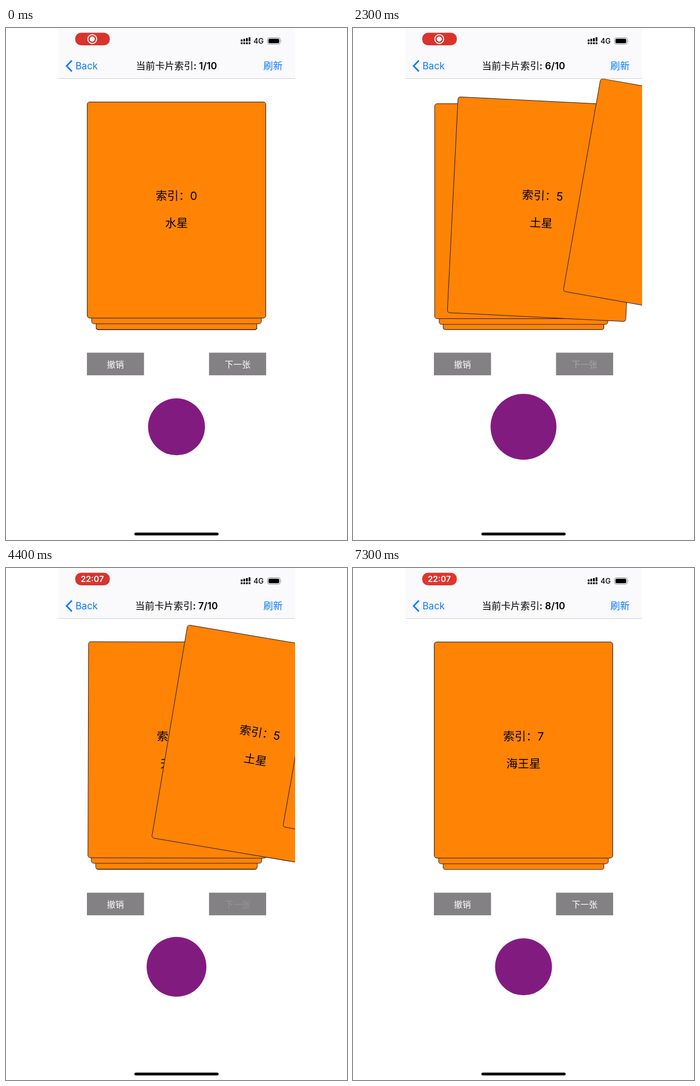
An HTML page that plays this animation: 611 by 917 pixels, repeating every 7.4 s.

```html
<!DOCTYPE html>
<html lang="zh-CN">
<head>
<meta charset="utf-8">
<title>卡片</title>
<style>
  html, body { margin: 0; width: 100%; height: 100%; overflow: hidden; background: #fff; }
  body, svg text { font-family: Inter, "Noto Sans CJK SC", "Noto Sans CJK", sans-serif; }
  #stage { position: absolute; left: 0; top: 0; width: 611px; height: 917px; overflow: hidden; }
  #phone { position: absolute; left: 94px; top: 0; width: 423.5px; height: 917px; overflow: hidden; }
  #cards { position: absolute; inset: 0; isolation: isolate; }
  .card {
    position: absolute; left: 51px; top: 131.5px; width: 321px; height: 388px;
    box-sizing: border-box; border: 1px solid #24202a; border-radius: 5px; background: #ff8305;
    color: #000; font-size: 20.5px; line-height: 30px; text-align: center; white-space: pre;
  }
  .card div { position: absolute; left: 0; width: 100%; }
  .card div:first-child { top: 153.5px; }
  .card div:last-child { top: 202.5px; }
  #header {
    position: absolute; left: 0; top: 0; width: 100%; height: 91px; box-sizing: border-box;
    border-bottom: 1px solid #d0cfd3; background: rgba(249, 248, 251, .8);
    backdrop-filter: blur(14px);
  }
  svg { position: absolute; left: 0; top: 0; }
</style>
</head>
<body>
<div id="stage">
  <div id="phone">
    <div id="cards"></div>
    <div id="header"></div>
  </div>
  <svg width="611" height="917" viewBox="0 0 611 917">
    <rect id="pill" x="124" y="8.5" width="62" height="22.5" rx="10.5"/>
    <g id="record" fill="#fff">
      <circle cx="154.5" cy="19.8" r="8" fill="none" stroke="#fff" stroke-width="1.8"/>
      <circle cx="154.5" cy="19.8" r="4.6"/>
    </g>
    <text id="clock" x="154.5" y="25" font-size="15" font-weight="600" fill="#fff" text-anchor="middle">22:07</text>

    <g id="signal"></g>
    <text x="443.5" y="28.3" font-size="13" font-weight="500">4G</text>
    <rect x="468.5" y="17.5" width="23" height="11.5" rx="3.3" fill="none" stroke="#888"/>
    <rect x="470.3" y="19.3" width="19.2" height="8" rx="1.8"/>
    <path d="M493.3 21.2q1.7 2 0 4z" fill="#888"/>

    <path d="M118 58.3L108.6 68l9.4 9.7" fill="none" stroke="#0a7aff" stroke-width="2.7"/>
    <text x="124.5" y="74" font-size="17" fill="#0a7aff">Back</text>
    <text x="305.5" y="74" font-size="17.2" font-weight="500" text-anchor="middle">当前卡片索引<tspan id="index" font-weight="600"></tspan></text>
    <text x="478.5" y="74" font-size="17.2" fill="#0a7aff" text-anchor="middle">刷新</text>

    <g fill="#848184">
      <rect x="145" y="581.5" width="102.3" height="40.5"/>
      <rect x="363.8" y="581.5" width="102.3" height="40.5"/>
    </g>
    <g font-size="15.3" fill="#fff" text-anchor="middle">
      <text id="undo" x="196" y="607.5">撤销</text>
      <text id="next" x="415" y="607.5">下一张</text>
    </g>
    <circle id="disc" cx="305.5" cy="714.3" fill="#821b80"/>
    <rect x="230" y="903.8" width="151" height="5" rx="2.5"/>
  </svg>
</div>
<script>
const LOOP = 7400, STEP = 100, SWELL = .36;
// travel: distance flown; shift: share of the time the stack moves; turn: distance to full tilt
const NEXT = { sign: 1, time: 550, travel: 480, shift: .2, turn: 178 };
const UNDO = { sign: -1, time: 420, travel: 420, shift: .55, turn: 325 };
const names = ['水星', '金星', '地球', '火星', '木星', '土星', '天王星', '海王星', '冥王星', '月球'];

// side: -1 left, 1 right; lift: rise per pixel travelled
const swipe = (start, card, side, lift = .066) => ({ start, card, kind: NEXT, side, lift });
const next = (start, card, lift) => ({ ...swipe(start, card, 1, lift), tap: true });
const undo = (start, card, lift = .041) => ({ start, card, kind: UNDO, side: -1, lift, tap: true });
const events = [
  swipe(100, 0, -1), swipe(600, 1, 1), swipe(1099, 2, 1, .445), swipe(1560, 3, -1),
  next(2008, 4), next(2212, 5, .047), next(2380, 6), next(2560, 7),
  undo(2990, 7), undo(3228, 6, .012), undo(3445, 5), undo(3590, 4),
  next(4010, 4), next(4199, 5, .047), next(4380, 6),
  undo(5000, 6), undo(5253, 5),
  next(5850, 5), next(6500, 6)
];
const pulse = [0, 1400, 2300, 3450, 4400, 5450, 6500, 7000, LOOP];

const $ = id => document.getElementById(id);
const clamp = x => Math.min(1, Math.max(0, x));
const smooth = x => (x = clamp(x), x * x * (3 - 2 * x));
const progress = (e, t) => (t - e.start) / e.kind.time;

const cards = names.map((name, i) => {
  const card = document.createElement('div');
  card.className = 'card';
  card.style.zIndex = names.length - i;
  card.innerHTML = `<div>索引：${i}</div><div>${name}</div>`;
  $('cards').append(card);
  return card;
});

$('signal').innerHTML = [0, 1, 2, 3].map(i => {
  const x = 420.6 + i * 4.7, h = 3.5 + i * 1.3;
  return `<rect x="${x}" y="${24 - h}" width="3.2" height="${h}" rx=".8"/>
          <rect x="${x}" y="25.6" width="3.2" height="3.4" rx=".8"/>`;
}).join('');

function placeCard(card, i, front, t) {
  const depth = Math.min(2, Math.max(0, i - front));
  const e = events.filter(e => e.card === i && e.start <= t).pop();
  let x = 0, y = 19.95 * depth, angle = 0;
  if (e) {
    const eased = smooth(progress(e, t));
    const distance = e.kind.travel * (e.kind === NEXT ? eased : 1 - eased);
    x = e.side * distance;
    y -= e.lift * distance;
    angle = e.side * 10 * Math.sin(Math.PI / 2 * clamp(distance / e.kind.turn));
  }
  card.style.transform = `translate(${x}px, ${y}px) rotate(${angle}deg) scale(${1 - .05 * depth})`;
}

function labelOpacity(kind, t) {
  const e = events.filter(e => e.kind === kind && e.tap && e.start <= t).pop();
  return e ? .15 + .85 * clamp((progress(e, t) - .05) / .7) : 1;
}

function pillColor(t) {
  const i = pulse.findIndex(p => p > t) - 1;
  const u = smooth((t - pulse[i]) / (pulse[i + 1] - pulse[i]));
  const glow = i % 2 ? 1 - u : u;
  return `rgb(${218 + 37 * glow}, ${51 + 8 * glow}, ${45 + 3 * glow})`;
}

function draw(t) {
  let front = 0, index = 1, swell = 0;
  for (const e of events) {
    const u = progress(e, t);
    front += e.kind.sign * smooth(u / e.kind.shift);
    if (u > .3) index += e.kind.sign;
    if (e.kind === NEXT) swell = Math.max(swell, Math.sin(Math.PI * clamp(u / SWELL)));
  }
  cards.forEach((card, i) => placeCard(card, i, front, t));
  $('index').textContent = `: ${index}/10`;
  $('disc').setAttribute('r', 51 * (1 + .16 * swell));
  $('next').setAttribute('opacity', labelOpacity(NEXT, t));
  $('undo').setAttribute('opacity', labelOpacity(UNDO, t));
  $('pill').setAttribute('fill', pillColor(t));
  const timed = t >= 2700;
  $('clock').style.display = timed ? '' : 'none';
  $('record').style.display = timed ? 'none' : '';
}

const origin = performance.now();
let shown = -1;
function tick() {
  const t = Math.floor((performance.now() - origin) % LOOP / STEP) * STEP;
  if (t !== shown) draw(shown = t);
  requestAnimationFrame(tick);
}
tick();
</script>
</body>
</html>
```
